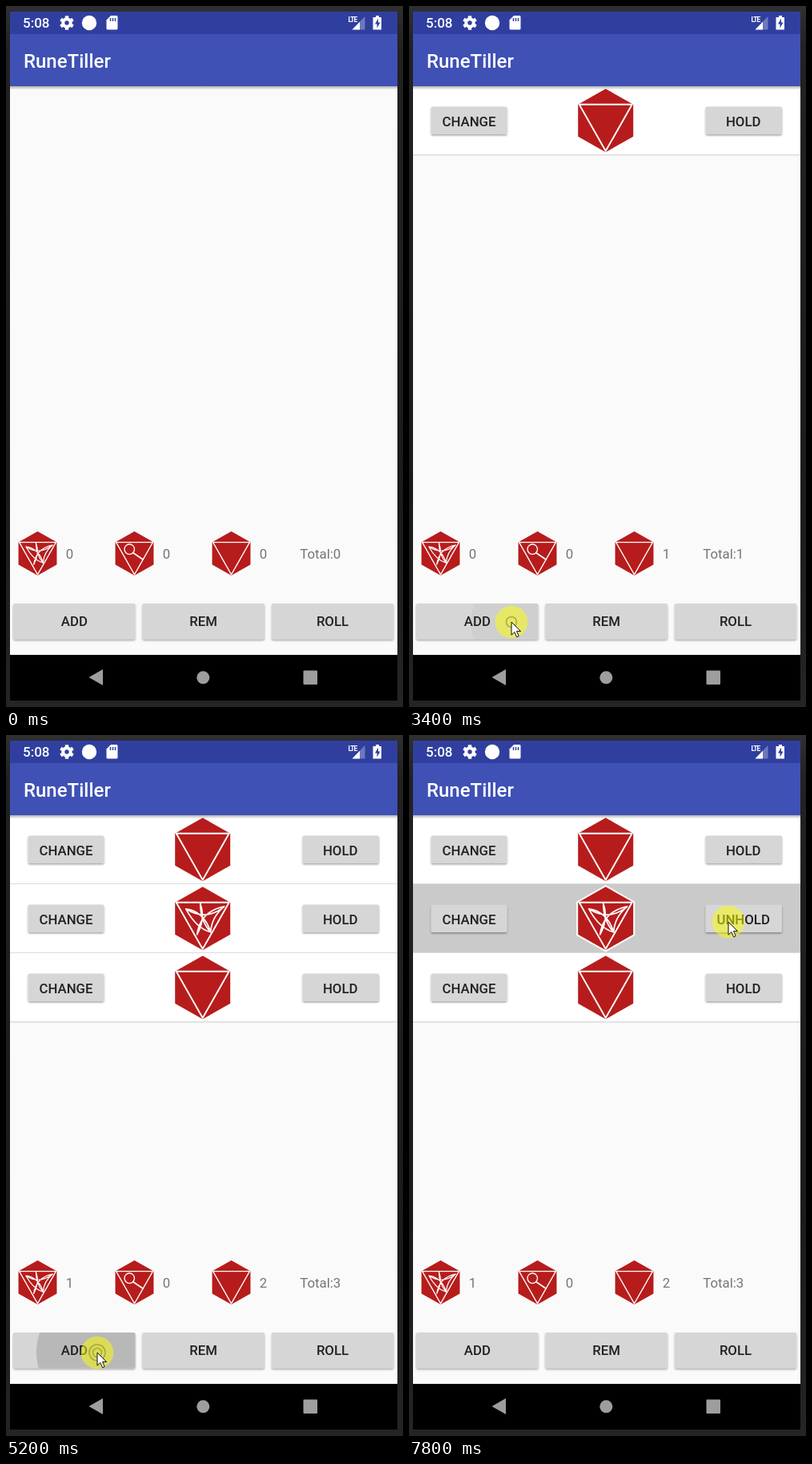
An HTML page that plays this animation: 496x874 px, repeating every 8000 ms.

```html
<!DOCTYPE html>
<html lang="en">
<head>
<meta charset="utf-8">
<title>Dice app</title>
<style>
  html, body { margin: 0; width: 100%; height: 100%; overflow: hidden; background: #202020; }
  svg { display: block; width: 496px; height: 874px; }
  text { font: 500 16.8px Roboto, "Noto Sans", sans-serif; fill: #212121; }
  .label { text-anchor: middle; }
  .count { font-weight: 400; fill: #757575; }
  .line { fill: none; stroke: #fff; stroke-width: 1.9; stroke-linejoin: round; }
</style>
</head>
<body>
<svg viewBox="0 0 496 874">
  <defs>
    <linearGradient id="desk" x2="0" y2="1">
      <stop offset="0" stop-color="#303030"/>
      <stop offset=".06" stop-color="#222"/>
      <stop offset=".7" stop-color="#1b1b1b"/>
      <stop offset="1" stop-color="#252525"/>
    </linearGradient>
    <linearGradient id="shade" x2="0" y2="1">
      <stop offset="0" stop-opacity=".3"/>
      <stop offset="1" stop-opacity="0"/>
    </linearGradient>
    <filter id="drop" x="-10%" y="-20%" width="120%" height="150%">
      <feDropShadow dx="0" dy="1.5" stdDeviation="1.1" flood-opacity=".36"/>
    </filter>
    <clipPath id="addClip"><rect x="9" y="745" width="152.5" height="44.5" rx="2"/></clipPath>
    <clipPath id="holdClip"><rect x="370.5" y="211.5" width="95.5" height="34.5" rx="2"/></clipPath>

    <g id="blank">
      <path d="M0-39.5 34.5-20V20L0 39.5-34.5 20V-20Z" fill="#b71c1c" stroke="#fff" stroke-width="4" paint-order="stroke"/>
      <path class="line" d="M-33-20H33L0 38Z"/>
    </g>
    <g id="star">
      <use href="#blank"/>
      <path class="line" d="M-21-12Q2-9 10 17Q-3 3-3-19Q4 0-7 20Q-3-9 27-15Q4 4-21-12Z M-21-12Q-8 12 10 17Q11-2 27-15" style="stroke-width:1.7"/>
    </g>
    <g id="lens">
      <use href="#blank"/>
      <circle class="line" cx="-9" cy="-7.5" r="9"/>
      <path class="line" d="M-2.5-1 16 11.5" style="stroke-width:2.4"/>
    </g>
  </defs>

  <rect width="496" height="874" fill="url(#desk)"/>
  <rect x="5" y="7" width="484" height="859" fill="#fafafa"/>
  <g id="rows"></g>
  <rect x="5" y="100" width="484" height="4.5" fill="url(#shade)"/>
  <rect x="5" y="7" width="484" height="28" fill="#303f9f"/>
  <rect x="5" y="35" width="484" height="65" fill="#3f51b5"/>
  <text x="22" y="77" style="font-size:24px;fill:#fff">RuneTiller</text>

  <g fill="#fff">
    <text x="21" y="27" style="font-size:17px;fill:#fff">5:08</text>
    <g id="gear" transform="translate(76 21)">
      <circle r="4.7" fill="none" stroke="#fff" stroke-width="4"/>
    </g>
    <circle cx="104" cy="21" r="9.2"/>
    <path d="M131 12h7q1.500 0 1.500 1.500v14.500q0 1.500-1.500 1.500h-11q-1.500 0-1.500-1.500v-10.500z"/>
    <path d="M130.500 15v4M133.500 15v4M136.500 15v4" stroke="#303f9f" stroke-width="1.5"/>
    <text x="427.500" y="19.500" style="font-size:8.500px;font-weight:700;letter-spacing:-1px;fill:#fff">LTE</text>
    <path d="M448.500 13v16.500h-16z" opacity=".3"/>
    <path d="M442 19.700v9.800h-9.500z"/>
    <path d="M462 12h4v2h3v15.500h-10.500V14h3.500z"/>
    <path d="M465 15.500-0 0" fill="none"/>
    <path d="M465 15.500l-4 7h2.500v5l4-7h-2.500z" fill="#303f9f"/>
  </g>

  <g id="counts"></g>
  <g id="actions"></g>
  <circle id="ripple" fill="#000"/>
  <g id="captions"></g>

  <rect x="5" y="809" width="484" height="57"/>
  <g fill="#9e9e9e">
    <path d="M103.500 837 121 827v20z"/>
    <circle cx="246.300" cy="837.300" r="8"/>
    <rect x="371.500" y="828.500" width="17.500" height="17.500" rx="1"/>
  </g>

  <g id="pointer">
    <circle r="20.300" fill="#ff0" fill-opacity=".5"/>
    <g id="rings" fill="none" stroke="#8f9320" stroke-opacity=".65" stroke-width="1.600">
      <circle/><circle/>
    </g>
    <path d="M0 0V16.200L3.800 12.600 6.600 18.800 9.200 17.600 6.500 11.600H11.600Z" fill="#fff" stroke="#111"/>
  </g>
</svg>

<script>
const LOOP = 8000, STEP = 100;
const $ = id => document.getElementById(id);
const set = (el, attrs) => { for (const k in attrs) el.setAttribute(k, attrs[k]); };

const rect = (x, y, w, h, extra = "") => `<rect x="${x}" y="${y}" width="${w}" height="${h}" ${extra}/>`;
const label = (x, y, s) => `<text class="label" x="${x}" y="${y}">${s}</text>`;
const count = (x, s) => `<text class="count" x="${x}" y="689">${s}</text>`;
const die = (kind, x, y, scale = 1) => `<use href="#${kind}" transform="translate(${x} ${y}) scale(${scale})"/>`;
const plate = (x, y, w, h) => rect(x, y, w, h, 'rx="2" fill="#d6d6d6" filter="url(#drop)"');

// time, x, y of the pointer
const path = [
  [2000, 488, 797], [2200, 414, 786], [2500, 269.5, 769.5], [2700, 188, 758], [2800, 164, 757],
  [2900, 140, 765], [3000, 128, 768], [3600, 128, 768], [4000, 114, 770], [5800, 114, 770],
  [5900, 115.5, 770.5], [6000, 115.5, 770.5], [6100, 170, 715], [6200, 310, 545], [6300, 412, 401.5],
  [6400, 414, 345], [6600, 407, 265], [6800, 400, 230], [6900, 400, 230], [7200, 399, 233]
];
const rolled = [[3400, "blank"], [4400, "star"], [5200, "blank"]];
const HELD_AT = 7500;

// start time, strength and clipped area of each press
const presses = [[3300, .4, "addClip"], [4200, 1, "addClip"], [5000, 1, "addClip"], [7400, .8, "holdClip"]];
const rippleAlpha = [.03, .08, .14, .1, .06, .02];

function pointerAt(t) {
  const i = path.findIndex(p => p[0] > t);
  if (i < 0) return path.at(-1).slice(1);
  if (i === 0) return null;
  const [t0, x0, y0] = path[i - 1], [t1, x1, y1] = path[i];
  const f = (t - t0) / (t1 - t0);
  return [x0 + (x1 - x0) * f, y0 + (y1 - y0) * f];
}

function row(kind, i, held) {
  const top = 100 + 86 * i, mid = top + 43;
  return rect(5, top, 484, 86, `fill="${held ? "#cacaca" : "#fff"}"`)
    + rect(5, top + 85, 484, 1.5, 'fill="#dcdcdc"')
    + plate(27.5, mid - 17.5, 95, 34.5) + plate(370.5, mid - 17.5, 95.5, 34.5)
    + label(75, mid + 6.5, "CHANGE") + label(417.7, mid + 6.5, held ? "UNHOLD" : "HOLD")
    + die(kind, 245.7, mid - .2);
}

function drawLists(t) {
  const dice = rolled.filter(r => r[0] <= t).map(r => r[1]);
  const n = kind => dice.filter(d => d === kind).length;
  $("rows").innerHTML = dice.map((d, i) => row(d, i, i === 1 && t >= HELD_AT)).join("");
  $("counts").innerHTML = ["star", "lens", "blank"].map((kind, i) =>
    die(kind, 39.5 + 121 * i, 682.5, .695) + count(74.8 + 121 * i, n(kind))).join("")
    + count(367.3, "Total:" + dice.length);
}

function drawPress(t, at) {
  const press = presses.find(p => t >= p[0] && t < p[0] + rippleAlpha.length * STEP);
  const k = press ? (t - press[0]) / STEP : -1;
  const showRipple = press && (press[2] === "addClip" || k < 4);
  set($("ripple"), { visibility: showRipple ? "visible" : "hidden" });
  set($("rings"), { visibility: press && k < 4 ? "visible" : "hidden" });
  if (!press) return;
  set($("ripple"), {
    cx: at[0], cy: at[1], r: 26 + 25 * k,
    "fill-opacity": rippleAlpha[k] * press[1], "clip-path": `url(#${press[2]})`
  });
  const [outer, inner] = $("rings").children;
  set(outer, { r: 3 + 3.5 * k });
  set(inner, { r: Math.max(0, 3.5 * k - 1.5) * (k > 1) });
}

function render(t) {
  drawLists(t);
  const at = pointerAt(t);
  set($("pointer"), { visibility: at ? "visible" : "hidden" });
  if (at) set($("pointer"), { transform: `translate(${at})` });
  drawPress(t, at);
  if (!at) set($("rings"), { visibility: "hidden" });
}

for (let a = 0; a < 360; a += 60)
  $("gear").innerHTML += rect(-2.2, -8.8, 4.4, 4, `rx=".5" transform="rotate(${a})"`);
["ADD", "REM", "ROLL"].forEach((s, i) => {
  $("actions").innerHTML += plate(9 + 161.4 * i, 745, 152.5, 44.5);
  $("captions").innerHTML += label(85.4 + 161.3 * i, 773, s);
});

let last = -1;
const start = performance.now();
function tick() {
  const t = Math.floor((performance.now() - start) % LOOP / STEP) * STEP;
  if (t !== last) render(last = t);
  requestAnimationFrame(tick);
}
tick();
</script>
</body>
</html>
```
